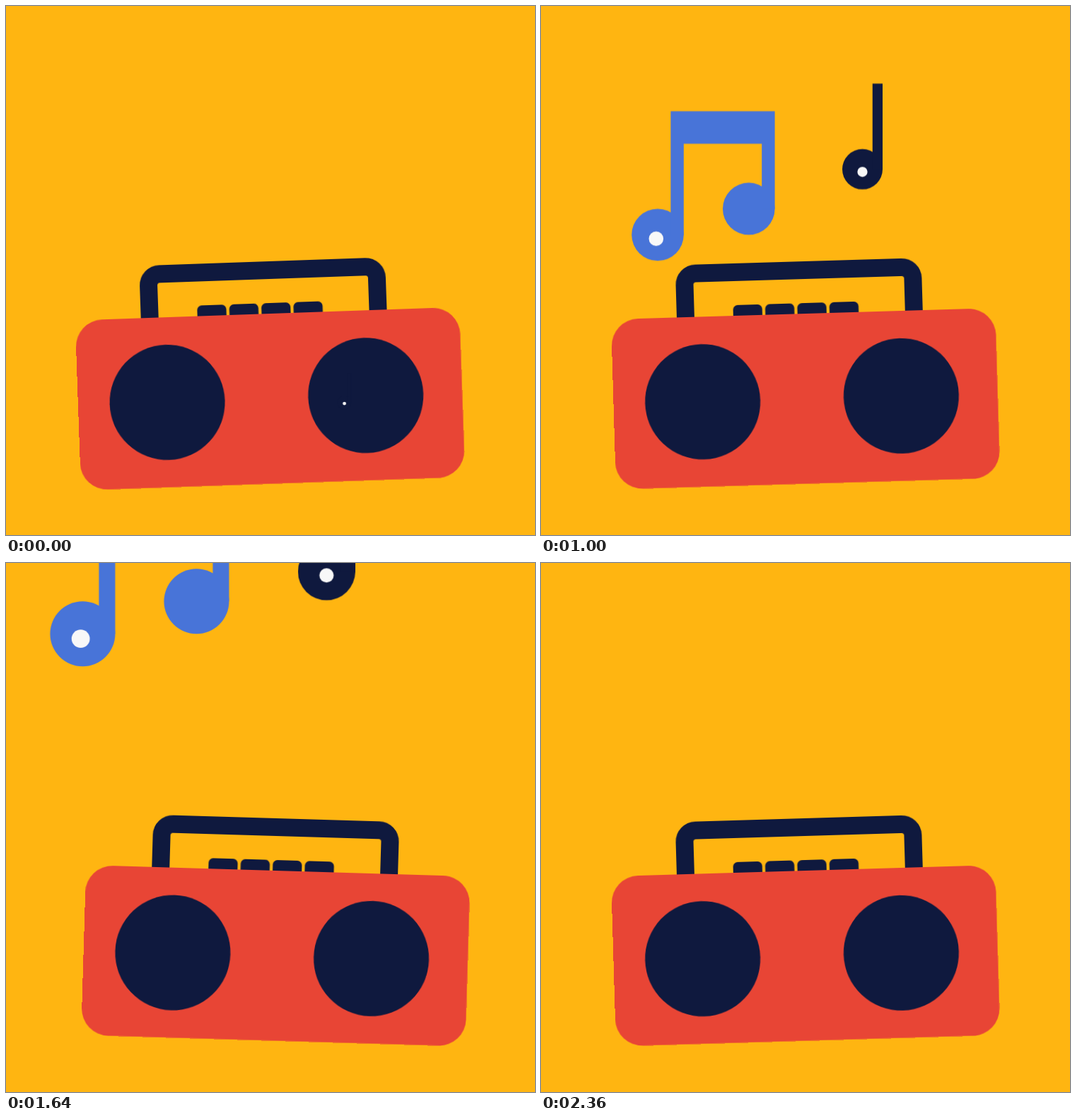
Animation of 748x748 px, one loop 2400 ms. Source, as an HTML page:

```html
<!DOCTYPE html>
<html lang="en">
<head>
<meta charset="utf-8">
<title>Boombox</title>
<style>
  html, body { margin: 0; width: 100%; height: 100%; overflow: hidden; background: #ffb511; }
  svg { display: block; width: 100%; height: 100%; }
  .navy { fill: #0f193e; }
  .red { fill: #e84535; }
  .blue { fill: #4874d8; }
  .badge { fill: #f8f8f8; }
  #box { transform-origin: 377.5px 676px; }
</style>
</head>
<body>
<svg viewBox="0 0 748 748">
  <g id="box">
    <path d="M211.5 450V389.5a16 16 0 0 1 16-16H518.5a16 16 0 0 1 16 16V450" fill="none" stroke="#0f193e" stroke-width="25"/>
    <g class="navy">
      <rect x="279" y="420" width="41.2" height="30" rx="6.5"/>
      <rect x="324.4" y="420" width="41.2" height="30" rx="6.5"/>
      <rect x="369.8" y="420" width="41.2" height="30" rx="6.5"/>
      <rect x="415.2" y="420" width="41.2" height="30" rx="6.5"/>
    </g>
    <rect class="red" x="106" y="435" width="543.5" height="240.5" rx="38"/>
    <g class="navy">
      <circle cx="232.2" cy="555.2" r="81.5"/>
      <circle cx="513" cy="555.2" r="81.5"/>
    </g>
  </g>

  <!-- Notes are drawn with a head radius of 1, centred on the origin -->
  <g id="pair" class="blue">
    <g transform="translate(-1.75 1.875)">
      <circle r="1"/>
      <circle cx="3.5" cy="-1" r="1"/>
      <path d="M.5 0V-4.75H4.5V-1H4V-3.5H1V0Z"/>
      <circle class="badge" cx="-.06" cy=".15" r=".28"/>
    </g>
  </g>
  <g id="single" class="navy">
    <g transform="translate(0 1.625)">
      <circle r="1"/>
      <path d="M.5 0V-4.25H1V0Z"/>
      <circle class="badge" cy=".13" r=".25"/>
    </g>
  </g>
</svg>
<script>
const LOOP = 2400, STEP = 40, SWING = 480;

// Shared flight path: [ms, x, y]
const path = [
  [0, 225.5, 543], [160, 270, 495], [360, 282, 417], [480, 278, 371],
  [680, 247.5, 298.5], [800, 229.4, 254.5], [1000, 201.5, 182.5],
  [1200, 181.5, 108], [1400, 187, 28.5], [1680, 202.5, -70], [2000, 220, -190]
];

const clamp = (v, lo, hi) => Math.min(hi, Math.max(lo, v));

function slope(i, axis) {
  const a = path[Math.max(0, i - 1)], b = path[Math.min(path.length - 1, i + 1)];
  return (b[axis] - a[axis]) / (b[0] - a[0]);
}

// Cubic Hermite interpolation along the path
function along(time, axis) {
  const t = clamp(time, 0, 2000);
  let i = 0;
  while (i < path.length - 2 && t > path[i + 1][0]) i++;
  const a = path[i], b = path[i + 1], d = b[0] - a[0], u = (t - a[0]) / d;
  const s = u * u * (3 - 2 * u), v = 1 - u;
  return a[axis] * (1 - s) + b[axis] * s
    + d * u * v * (v * slope(i, axis) - u * slope(i + 1, axis));
}

function swing(t) {
  const p = (t % SWING) / SWING * 2;
  const u = p < 1 ? p : 2 - p;
  return `rotate(${-2 + 4 * u * u * (3 - 2 * u)}deg)`;
}

const fly = (t, dx, dy, size) =>
  `translate(${along(t, 1) + dx}px, ${along(t, 2) + dy}px) scale(${size})`;

const pair = t => fly(t - 200, 0, 0, 46 * clamp((t - 200) / 1000, 0, 1));
const single = t => fly(t, 253, 2, 9.75 + 0.01875 * t);

function play(id, pose) {
  const frames = [];
  for (let t = 0; t <= LOOP; t += STEP)
    frames.push({ offset: t / LOOP, transform: pose(t), easing: "step-end" });
  document.getElementById(id).animate(frames, { duration: LOOP, iterations: Infinity });
}

play("box", swing);
play("pair", pair);
play("single", single);
</script>
</body>
</html>
```
